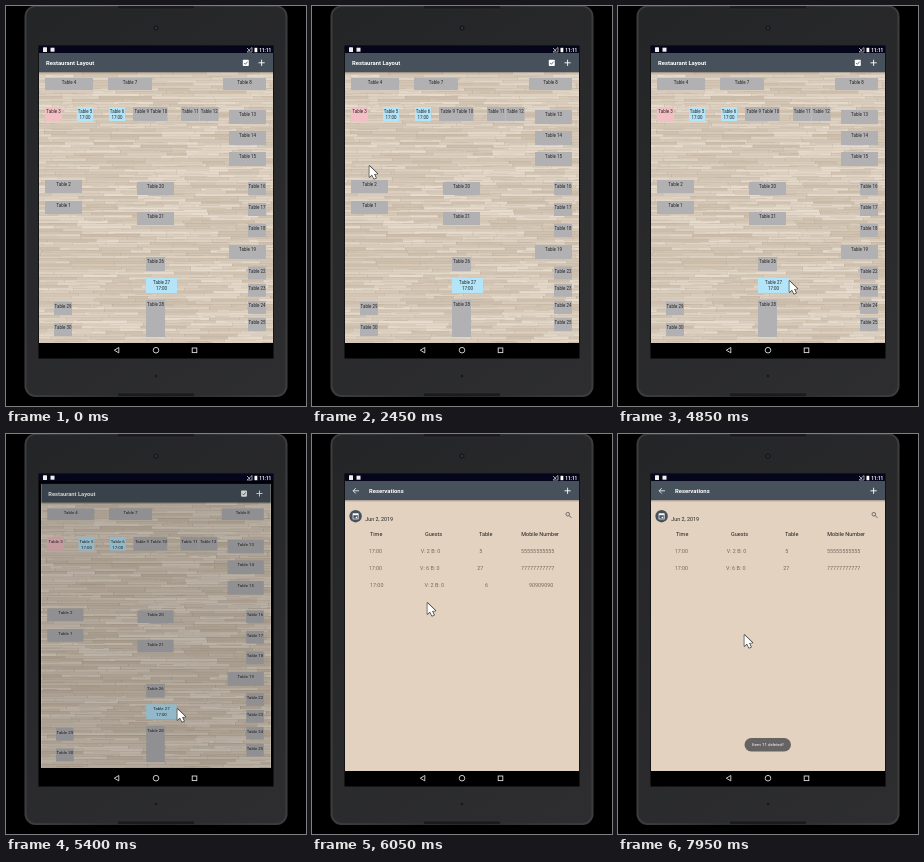
An HTML page with a canvas that plays this animation: 300 by 400 pixels, repeating every 8000 ms.

```html
<!DOCTYPE html>
<html lang="en">
<head>
<meta charset="utf-8">
<title>Restaurant Layout</title>
<style>
html, body { margin: 0; width: 100%; height: 100%; overflow: hidden; background: #000; }
canvas { display: block; width: 300px; height: 400px; }
</style>
</head>
<body>
<canvas id="stage"></canvas>
<script>
const LOOP = 8000, STEP = 50;
const W = 300, H = 400;
const SCREEN = { x: 33, y: 47, w: 234, h: 290 };
const FONT = 'Roboto, "Open Sans", sans-serif';
const GREY = '#b1b0b2', BLUE = '#b4e4f7', PINK = '#f3bfc4', SLATE = '#46515b';

const canvas = document.getElementById('stage');
const dpr = window.devicePixelRatio || 1;
canvas.width = W * dpr;
canvas.height = H * dpr;
const ctx = canvas.getContext('2d');

const clamp = v => Math.max(0, Math.min(1, v));
const ease = v => v * v * (3 - 2 * v);
const ramp = (t, a, b) => clamp((t - a) / (b - a));

const tables = [];
const reserved = [5, 6, 27];

function place(n, x, y, w = 18, h = 13) {
  tables.push({ n, x, y, w, h });
}

function column(first, last, x, y, gap, w, h) {
  const dir = Math.sign(last - first);
  for (let i = 0; i <= Math.abs(last - first); i++) place(first + i * dir, x, y + i * gap, w, h);
}

function row(first, last, x, gap, w) {
  for (let n = first; n <= last; n++) place(n, x + (n - first) * gap, 101, w, 14);
}

place(4, 39, 72, 48, 12);
place(7, 102, 72, 44, 12);
place(8, 217, 72, 43, 12);
row(3, 3, 39, 0, 17);
row(5, 6, 71, 32, 16);
row(9, 10, 127, 17, 17.5);
row(11, 12, 175, 19, 18.5);
column(13, 15, 223, 104, 21, 37, 14);
column(2, 1, 39, 174, 21, 37);
column(20, 21, 131, 176, 30, 37);
column(16, 18, 242, 176, 21);
place(19, 223, 239, 37, 14);
column(22, 25, 242, 260.5, 17.2);
place(26, 140, 251, 19, 14);
place(27, 140, 272, 31, 15);
place(28, 140, 294, 19, 37);
column(29, 30, 48, 296, 21);

// time, x, y of the pointer tip
const pointerPath = [
  [2200, 24, 168], [2450, 57, 160], [2700, 60, 158],
  [3700, 236, 84], [4050, 236, 84], [4850, 171, 275], [5650, 171, 275],
  [6000, 115, 169], [6150, 115, 169], [6450, 100, 182], [6700, 98, 151],
  [6800, 98, 151], [7200, 205, 153], [7350, 205, 153], [7750, 126, 201], [8000, 126, 201]
];

function box(c, x, y, w, h, color) {
  c.fillStyle = color;
  c.fillRect(x, y, w, h);
}

function round(x, y, w, h, r, color) {
  ctx.fillStyle = color;
  ctx.beginPath();
  ctx.roundRect(x, y, w, h, r);
  ctx.fill();
}

function disc(x, y, r, color) {
  ctx.fillStyle = color;
  ctx.beginPath();
  ctx.arc(x, y, r, 0, Math.PI * 2);
  ctx.fill();
}

function ring(x, y, r, color, width) {
  ctx.strokeStyle = color;
  ctx.lineWidth = width;
  ctx.beginPath();
  ctx.arc(x, y, r, 0, Math.PI * 2);
  ctx.stroke();
}

function line(points, color, width, closed) {
  ctx.strokeStyle = color;
  ctx.lineWidth = width;
  ctx.beginPath();
  points.forEach(p => ctx.lineTo(p[0], p[1]));
  if (closed) ctx.closePath();
  ctx.stroke();
}

function text(str, x, y, size, color, align = 'left', weight = 400) {
  ctx.font = `${weight} ${size}px ${FONT}`;
  ctx.fillStyle = color;
  ctx.textAlign = align;
  ctx.textBaseline = 'alphabetic';
  ctx.fillText(str, x, y);
}

function makeWood() {
  const scale = 2 * dpr;
  const wood = document.createElement('canvas');
  wood.width = SCREEN.w * scale;
  wood.height = SCREEN.h * scale;
  const c = wood.getContext('2d');
  c.scale(scale, scale);
  let seed = 41;
  const rnd = () => (seed = (seed * 16807) % 2147483647) / 2147483647;
  const tone = k => `rgb(${196 + 36 * k | 0},${180 + 41 * k | 0},${160 + 47 * k | 0})`;
  box(c, 0, 0, SCREEN.w, SCREEN.h, '#d9ccba');
  for (let y = 0; y < SCREEN.h; y += 2.7) {
    for (let x = -rnd() * 40; x < SCREEN.w;) {
      const len = 18 + rnd() * 44;
      box(c, x, y, len, 2.7, tone(0.25 + 0.75 * rnd()));
      box(c, x + rnd() * len * 0.5, y + rnd() * 2, len * 0.45, 0.5, tone(rnd() * 0.7));
      box(c, x, y, 0.4, 2.7, 'rgba(130,110,90,.3)');
      x += len;
    }
    box(c, 0, y, SCREEN.w, 0.4, 'rgba(150,130,110,.28)');
  }
  return wood;
}
const wood = makeWood();

function drawTablet() {
  box(ctx, 0, 0, W, H, '#000');
  const edge = ctx.createLinearGradient(18, 0, 282, 0);
  edge.addColorStop(0, '#3c3d3f');
  edge.addColorStop(0.5, '#29292b');
  edge.addColorStop(1, '#3c3d3f');
  round(18.5, -0.5, 263, 391.5, 11, edge);
  const face = ctx.createLinearGradient(20, 0, 280, 400);
  face.addColorStop(0, '#242527');
  face.addColorStop(1, '#2e2e30');
  round(20.5, 1, 259, 388, 9, face);
  for (const y of [0, 387]) box(ctx, 112, y, 76, 3, '#1b1b1d');
  for (const y of [3, 387]) line([[112, y], [188, y]], '#363739', 0.5);
  disc(150, 22, 2.6, '#171820');
  disc(150, 22, 1.2, '#30343e');
  disc(150, 370, 1.3, '#17171a');
  box(ctx, 32.5, 39.5, 235, 313, '#000');
}

function drawSystemBars() {
  box(ctx, 33, 40, 234, 7, '#05051c');
  round(37, 41.3, 4, 4.7, 0.6, '#eee');
  box(ctx, 44.5, 41.7, 4, 4, '#eee');
  line([[241, 46], [246, 46], [246, 41.5]], '#bbb', 0.8, true);
  line([[241, 42], [244, 45]], '#eee', 0.7);
  box(ctx, 248.5, 41.8, 2.8, 4.4, '#fff');
  text('11:11', 253.2, 45.5, 4.7, '#fff', 'left', 700);
  box(ctx, 33, 337, 234, 15, '#000');
  line([[112.8, 341.5], [108.3, 344.2], [112.8, 346.9]], '#ddd', 0.9, true);
  ring(150, 344.2, 2.8, '#ddd', 0.9);
  ctx.strokeRect(186.2, 342, 4.6, 4.6);
}

function drawToolbar(title, x) {
  box(ctx, 33, 47, 234, 19, SLATE);
  const shade = ctx.createLinearGradient(0, 66, 0, 68);
  shade.addColorStop(0, 'rgba(0,0,0,.3)');
  shade.addColorStop(1, 'rgba(0,0,0,0)');
  box(ctx, 33, 66, 234, 2, shade);
  text(title, x, 59, 5.9, '#fff', 'left', 700);
  line([[252.5, 56.8], [258.7, 56.8]], '#fff', 0.9);
  line([[255.6, 53.7], [255.6, 59.9]], '#fff', 0.9);
}

function drawLayout() {
  ctx.drawImage(wood, SCREEN.x, SCREEN.y, SCREEN.w, SCREEN.h);
  drawToolbar('Restaurant Layout', 40);
  round(236.8, 53.8, 6, 6.2, 0.8, '#fff');
  line([[238.2, 57], [239.4, 58.3], [241.6, 55.6]], SLATE, 0.8);
  for (const { n, x, y, w, h } of tables) {
    const busy = reserved.includes(n);
    box(ctx, x, y, w, h, busy ? BLUE : n === 3 ? PINK : GREY);
    text('Table ' + n, x + w / 2, y + 6, 4.45, '#222', 'center');
    if (busy) text('17:00', x + w / 2, y + 12.2, 4.45, '#222', 'center');
  }
}

function drawRow(cells, xs, y) {
  cells.forEach((cell, i) => text(cell, xs[i], y, 5.4, '#75695f'));
}

function drawReservations(t) {
  box(ctx, SCREEN.x, SCREEN.y, SCREEN.w, SCREEN.h, '#e3d2bf');
  drawToolbar('Reservations', 57);
  line([[47, 56.8], [41.2, 56.8]], '#fff', 0.8);
  line([[43.8, 54.1], [41.1, 56.8], [43.8, 59.5]], '#fff', 0.8);

  disc(43.6, 82.2, 6.2, SLATE);
  ctx.strokeStyle = '#fff';
  ctx.lineWidth = 0.7;
  ctx.strokeRect(41, 79.8, 5.2, 5.2);
  box(ctx, 41, 79.6, 5.2, 1.6, '#fff');
  box(ctx, 43.7, 82.7, 1.5, 1.4, '#fff');
  text('Jun 2, 2019', 53.3, 87, 5.4, '#222');
  ring(255.8, 80.2, 1.8, '#555', 0.8);
  line([[257.1, 81.5], [259.4, 83.8]], '#555', 0.9);

  text('Time', 58, 101.8, 5.5, '#1c1c1c');
  text('Guests', 113, 101.8, 5.5, '#1c1c1c');
  text('Table', 167, 101.8, 5.5, '#1c1c1c');
  text('Mobile Number', 209.3, 101.8, 5.5, '#1c1c1c');
  drawRow(['17:00', 'V: 2 B: 0', '5', '55555555555'], [56.7, 108.8, 167.3, 209], 119);
  drawRow(['17:00', 'V: 6 B: 0', '27', '77777777777'], [56.7, 108, 165.3, 209], 136);

  const slide = ease(ramp(t, 6800, 7250)) * 212;
  if (slide < 212) {
    drawRow(['17:00', 'V: 2 B: 0', '6', '90909090'], [58, 112.5, 173, 217].map(x => x + slide), 153.3);
  }

  const toast = ramp(t, 7400, 7600);
  if (toast > 0) {
    ctx.save();
    ctx.globalAlpha *= toast;
    round(126.5, 304, 46.5, 13.6, 6.8, '#666462');
    text('Item 11 deleted!', 149.8, 312.4, 4.4, '#fff', 'center');
    ctx.restore();
  }
}

function drawApp(t) {
  ctx.save();
  ctx.beginPath();
  ctx.rect(SCREEN.x, SCREEN.y, SCREEN.w, SCREEN.h);
  ctx.clip();
  if (t < 5550) {
    const leave = ramp(t, 5100, 5400);
    const s = 1 - 0.02 * leave;
    ctx.save();
    ctx.translate(150, 192);
    ctx.scale(s, s);
    ctx.translate(-150, -192);
    drawLayout();
    box(ctx, SCREEN.x, SCREEN.y, SCREEN.w, SCREEN.h, `rgba(0,0,0,${0.19 * leave})`);
    ctx.restore();
  }
  const white = ramp(t, 5400, 5550);
  if (white > 0) box(ctx, SCREEN.x, SCREEN.y, SCREEN.w, SCREEN.h, `rgba(255,254,250,${white})`);
  const enter = ramp(t, 5600, 5750);
  if (enter > 0) {
    ctx.globalAlpha = enter;
    drawReservations(t);
  }
  ctx.restore();
}

function drawPointer(t) {
  const i = pointerPath.findIndex(p => p[0] > t);
  if (i < 1) return;
  const [t0, x0, y0] = pointerPath[i - 1], [t1, x1, y1] = pointerPath[i];
  const k = ease(ramp(t, t0, t1));
  ctx.save();
  ctx.translate(x0 + (x1 - x0) * k, y0 + (y1 - y0) * k);
  const arrow = [[0.4, 0], [0.4, 11], [3, 8.7], [5, 12.8], [7, 11.9], [5.1, 7.9], [8.5, 7.7]];
  ctx.lineJoin = 'round';
  line(arrow, '#333', 1.3, true);
  ctx.fillStyle = '#fff';
  ctx.fill();
  ctx.restore();
}

function draw(now) {
  const t = Math.floor((now % LOOP) / STEP) * STEP;
  ctx.setTransform(dpr, 0, 0, dpr, 0, 0);
  drawTablet();
  drawSystemBars();
  drawApp(t);
  drawPointer(t);
}

const start = performance.now();
function tick() {
  draw(performance.now() - start);
  requestAnimationFrame(tick);
}
tick();
</script>
</body>
</html>
```
